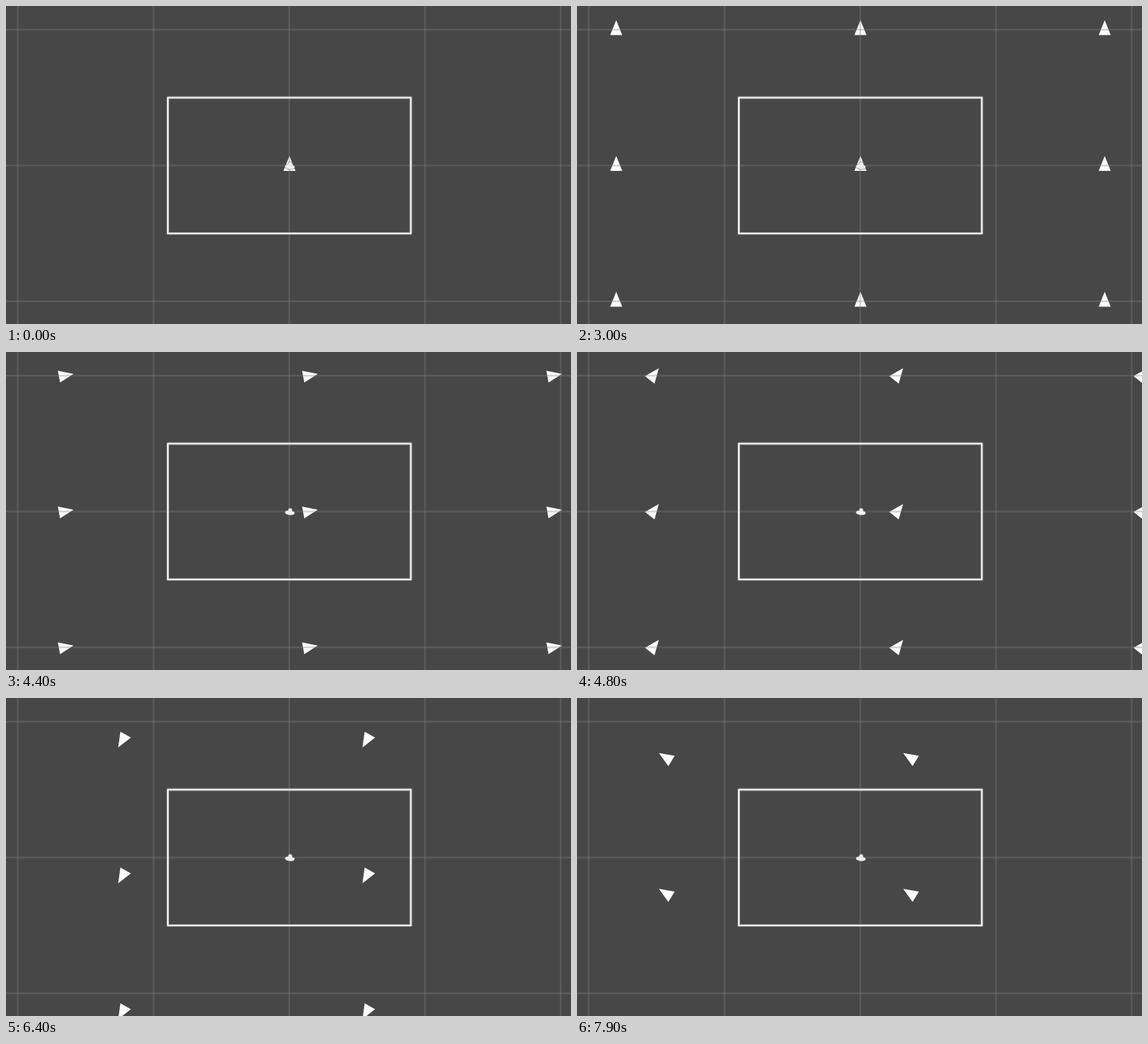
Animation, 768 px wide and 432 px high, one loop 8000 ms. Source, as an HTML page with a canvas:

```html
<!DOCTYPE html>
<html lang="en">
<head>
<meta charset="utf-8">
<title>Ship wrapping</title>
<style>
  html, body { margin: 0; width: 100%; height: 100%; overflow: hidden; background: #474747; }
  canvas { display: block; }
</style>
</head>
<body>
<canvas id="stage" width="768" height="432"></canvas>
<script>
const ctx = document.getElementById('stage').getContext('2d');
const LOOP = 8, STEP = 0.1;
const CX = 385.3, CY = 216.7, CELL = 184.5, WRAP_X = 332;
const rad = degrees => degrees * Math.PI / 180;

// The pilot's input, in seconds; angles run counter-clockwise from east.
const spins = [
  { from: 3, to: 3.85, turn: -90 },
  { from: 4.3, to: 4.8, turn: 52 },
  { from: 4.8, to: 5.6, turn: 158 },
  { from: 5.6, to: 6.4, turn: 30 },
  { from: 6.5, to: 7.4, turn: -120 },
  { from: 7.4, to: 7.9, turn: 28 }
];
const burns = [
  { from: 3.8, to: 4.15, angle: 0, speed: 60.6 },
  { from: 4.9, to: 5.2, angle: 90, speed: 8 },
  { from: 5.6, to: 6.23, angle: 220, speed: 111 },
  { from: 6.95, to: 7.45, angle: 90, speed: 99 }
];

// Time spent inside an interval so far.
const spent = (t, { from, to }) => Math.min(Math.max(t - from, 0), to - from);

const heading = t =>
  spins.reduce((sum, s) => sum + s.turn * spent(t, s) / (s.to - s.from), 90);

// Each burn accelerates evenly, then its speed is kept.
function position(t) {
  let x = CX, y = CY;
  for (const b of burns) {
    const way = b.speed *
      (spent(t, b) ** 2 / (2 * (b.to - b.from)) + Math.max(0, t - b.to));
    x += way * Math.cos(rad(b.angle));
    y -= way * Math.sin(rad(b.angle));
  }
  return [x, y];
}

function drawShip(x, y, angle) {
  ctx.save();
  ctx.translate(x, y);
  ctx.rotate(-rad(angle));
  ctx.beginPath();
  ctx.moveTo(13, 0);
  ctx.lineTo(-7.2, 8.2);
  ctx.lineTo(-7.2, -8.2);
  ctx.fillStyle = '#fcfcfc';
  ctx.fill();
  ctx.restore();
}

function drawGrid() {
  ctx.fillStyle = 'rgba(128, 128, 128, .33)';
  for (let i = -2; i <= 2; i++) {
    ctx.fillRect(383.8 + i * CELL, 0, 2.4, 432);
    ctx.fillRect(0, 215.5 + i * CELL, 768, 2.4);
  }
}

function drawMarker() {
  ctx.beginPath();
  ctx.ellipse(385.8, 218.4, 6.6, 3, 0.1, 0, 7);
  ctx.ellipse(386.3, 215.3, 2.6, 3, 0, 0, 7);
  ctx.strokeStyle = 'rgba(100, 100, 100, .5)';
  ctx.lineWidth = 2;
  ctx.stroke();
  ctx.fillStyle = '#eee';
  ctx.fill();
}

function drawScreenBorder() {
  const line = (width, color) => {
    ctx.lineWidth = width;
    ctx.strokeStyle = color;
    ctx.strokeRect(220, 124.6, 330.3, 184.3);
  };
  ctx.lineJoin = 'round';
  line(4, 'rgba(190, 190, 190, .45)');
  line(2, '#f6f6f6');
}

function draw(t) {
  ctx.fillStyle = '#474747';
  ctx.fillRect(0, 0, 768, 432);
  const reach = t < 1.5 ? 0 : 1;
  const [x, y] = position(t);
  for (let row = -reach; row <= reach; row++)
    for (let col = -reach; col <= reach; col++)
      drawShip(x + col * WRAP_X, y + row * CELL, heading(t));
  drawGrid();
  drawMarker();
  drawScreenBorder();
}

const start = performance.now();
function frame() {
  const t = (performance.now() - start) / 1000 % LOOP;
  draw(Math.floor(t / STEP + 1e-6) * STEP);
  requestAnimationFrame(frame);
}
frame();
</script>
</body>
</html>
```
